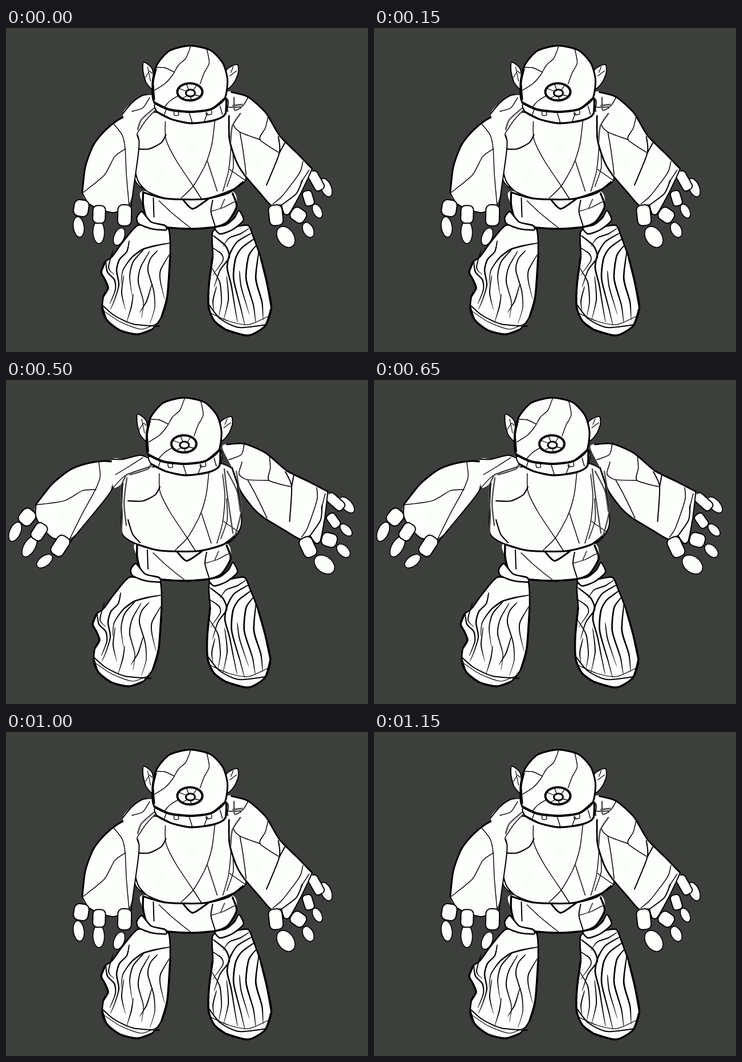
Write an HTML page with a canvas that moves like this. It is 635x568 px and loops after 1250 ms.

```html
<!DOCTYPE html>
<html>
<head>
<meta charset="utf-8">
<title>Stone golem</title>
<style>
html, body { margin: 0; width: 100%; height: 100%; overflow: hidden; background: #3d3f3c; }
canvas { display: block; }
</style>
</head>
<body>
<canvas id="stage" width="635" height="568"></canvas>
<script>
const ctx = document.getElementById('stage').getContext('2d');
const BG = '#3d3f3c', STONE = '#fdfffc', INK = '#000', SMEAR = '#4b4b4b';
const STEP = 250;
const ORDER = ['down', 'mid', 'up', 'mid', 'down'];

// Arms turn around a point in the hand, which is carried to `to`.
const POSES = {
  down: {
    sway: 10.5, leg: 15, lean: 0.033,
    left: { to: [166, 339.8], turn: -13.5 },
    right: { to: [523.5, 318], turn: 8.5 },
    torso: '222,150 217,200 215,264 235,285 272,299 335,300 385,284 410,266 402,225 391,180 378,145 300,150',
    shoulder: '205,150 222,130 240,118 257,116 266,140 246,160 230,186 218,185',
    rim: '205,150 222,130 240,118 257,116',
    folds: ['221,146 240,140 252,122', '230,185 246,161 268,138'],
    smears: ['264,137 238,160 231,178', '400,122 401,144 412,140', '398,136 414,134', '411,150 397,172 394,200']
  },
  mid: {
    sway: 0, leg: 0, lean: 0,
    left: { to: [99.5, 321.3], turn: 0 },
    right: { to: [542.1, 307.4], turn: 0 },
    torso: '240,158 207,192 208,235 206,274 230,288 270,299 335,300 392,284 412,264 413,242 398,215 385,180 375,145 300,150',
    shoulder: '190,150 205,141 225,134 250,132 258,150 232,166 208,192 197,186',
    rim: '191,151 205,142 225,134 250,132',
    folds: ['205,152 225,147 242,136', '202,200 228,172 257,150'],
    smears: ['209,198 206,230 207,272', '213,245 216,273', '196,212 183,252 167,294', '410,240 412,262', '236,160 248,145 252,134']
  },
  up: {
    sway: 0, leg: 0, lean: 0,
    left: { to: [53.5, 278.5], turn: 18 },
    right: { to: [574.1, 267.3], turn: -10 },
    torso: '235,155 207,173 203,225 204,270 230,288 270,299 335,300 392,284 411,260 413,235 407,195 402,160 370,145 300,150',
    shoulder: '186,140 205,138 235,132 255,138 257,152 225,166 206,180 188,188',
    rim: '187,139 205,139 235,132 253,138',
    folds: ['192,166 215,152 240,136', '187,190 210,167 255,151'],
    smears: ['210,168 201,190 204,235 202,270', '212,172 207,215 211,255', '218,166 250,155 256,138', '383,156 388,200 398,268', '404,160 413,225 402,273', '388,160 405,194 411,230']
  }
};

const LEFT_ARM = '192,150 170,155 145,167 119,187 96,221 80,264 86,284 102,299 126,311 150,307 166,286 190,225 198,200 198,182';
const RIGHT_ARM = '377,124 415,127 450,150 480,186 515,212 545,235 540,253 531,282 517,318 508,320 501,306 483,309 460,290 428,262 411,241 394,206 387,165';
const LEFT_LEG = '216,346 190,375 171,401 159,410 152,428 158,440 164,456 156,470 154,496 165,516 185,530 215,537 240,529 258,506 268,470 273,400 270,352 245,350';
const RIGHT_LEG = '357,356 358,400 353,450 354,490 365,514 385,529 425,539 454,522 464,490 455,448 443,405 428,366 418,346 390,350';

const LEFT_FLAMES = [
  '273,377 250,381 225,388 205,403 190,425 187,447',
  '201,374 197,392 184,406 179,425 183,450 176,475 169,492',
  '160,410 163,428 175,441 177,458 168,482',
  '225,390 208,410 202,435 206,468',
  '236,393 221,420 217,445 226,480 223,507',
  '250,391 238,405 234,425 244,460 246,490 238,517',
  '271,398 256,425 256,445 263,474',
  '191,436 188,465 194,492', '208,468 205,488 197,515',
  '240,452 232,478 220,498', '172,392 165,420 174,432'
];
const RIGHT_FLAMES = [
  '424,360 400,375 388,396 384,420 392,450 400,490 405,514',
  '429,370 408,386 398,405 396,440 410,490 418,520',
  '433,382 421,400 418,440 432,485 437,515',
  '438,396 435,440 447,480 450,510',
  '359,365 380,382 387,402 372,424 363,452',
  '357,385 373,396 376,408 360,432',
  '358,422 372,446 376,480 372,506',
  '366,455 361,478 363,495', '419,352 405,361 386,368 376,382',
  '384,438 388,475 381,512', '406,428 410,455 425,500'
];

const parse = s => s.split(' ').map(p => p.split(',').map(Number));

function trace(pts, closed) {
  const n = pts.length;
  const at = i => closed ? pts[(i + n) % n] : pts[Math.max(0, Math.min(n - 1, i))];
  ctx.beginPath();
  ctx.moveTo(...pts[0]);
  for (let i = 0; i < (closed ? n : n - 1); i++) {
    const [a, b, c, d] = [at(i - 1), at(i), at(i + 1), at(i + 2)];
    ctx.bezierCurveTo(b[0] + (c[0] - a[0]) / 8, b[1] + (c[1] - a[1]) / 8,
      c[0] - (d[0] - b[0]) / 8, c[1] - (d[1] - b[1]) / 8, c[0], c[1]);
  }
}

function ink(width, color = INK) {
  ctx.lineWidth = width;
  ctx.strokeStyle = color;
  ctx.stroke();
}

function blob(s, width) {
  trace(parse(s), true);
  ctx.fillStyle = STONE;
  ctx.fill();
  if (width) ink(width);
}

function lines(width, list, color) {
  for (const s of list) {
    trace(parse(s));
    ink(width, color);
  }
}

// Pen stroke that thins towards both ends.
function brush(s, width) {
  const p = parse(s), n = p.length - 1, left = [], right = [];
  p.forEach(([x, y], i) => {
    const a = p[Math.max(0, i - 1)], b = p[Math.min(n, i + 1)];
    const dx = b[0] - a[0], dy = b[1] - a[1], len = Math.hypot(dx, dy);
    const h = width / 2 * (0.3 + 0.7 * Math.sin(Math.PI * (0.15 + 0.85 * i / n)));
    left.push([x - dy / len * h, y + dx / len * h]);
    right.unshift([x + dy / len * h, y - dx / len * h]);
  });
  trace(left.concat(right), true);
  ctx.fillStyle = INK;
  ctx.fill();
}

function oval(x, y, rx, ry, deg = 0, width = 1.6) {
  ctx.beginPath();
  ctx.ellipse(x, y, rx, ry, deg * Math.PI / 180, 0, 7);
  ctx.fillStyle = STONE;
  ctx.fill();
  ink(width);
}

function knuckle(x, y, w, h, deg) {
  ctx.save();
  ctx.translate(x, y);
  ctx.rotate(deg * Math.PI / 180);
  ctx.beginPath();
  ctx.roundRect(-w / 2, -h / 2, w, h, Math.min(w, h) * 0.36);
  ctx.fillStyle = STONE;
  ctx.fill();
  ink(2);
  ctx.restore();
}

function shifted(dx, draw) {
  ctx.save();
  ctx.translate(dx, 0);
  draw();
  ctx.restore();
}

function arm(place, from, draw) {
  ctx.save();
  ctx.translate(...place.to);
  ctx.rotate(place.turn * Math.PI / 180);
  ctx.translate(-from[0], -from[1]);
  draw();
  ctx.restore();
}

function leftArm() {
  oval(60, 321, 9.5, 18, 6);
  oval(92, 338, 10, 20, 12);
  oval(125, 354, 9, 16, 35);
  blob(LEFT_ARM);
  lines(3, ['192,150 170,155 145,167 119,187 96,221 80,264']);
  lines(2, ['80,264 86,284 102,299 126,311 150,307', '197,178 198,200 190,225 166,286 158,307', '191,150 195,168 198,195']);
  lines(1.4, ['162,160 172,183 171,208 163,250 155,303', '82,264 125,243 150,216 172,207']);
  knuckle(72, 290, 26, 29, 22);
  knuckle(100, 308, 22, 31, 15);
  knuckle(143, 320, 24, 37, 15);
}

function rightArm() {
  oval(574, 264, 9, 17, -32);
  oval(565, 307, 7.5, 13, -35);
  oval(554, 342, 9, 14, -35);
  oval(517, 360, 14, 20, -42);
  knuckle(555, 255, 18, 36, -38);
  knuckle(546, 287, 17, 27, -25);
  knuckle(533, 319, 27, 24, 25);
  blob(RIGHT_ARM);
  lines(2.8, ['385,123 415,127 450,150 480,186 515,212 545,235', '387,165 394,206 411,241 428,262 460,290 483,309 501,306']);
  lines(2, ['545,235 540,253 531,282 517,318 508,320 501,306', '531,257 524,282 501,306', '478,188 484,216 470,275', '491,197 484,216']);
  lines(1.5, ['415,128 407,145 384,150', '455,157 453,177 447,198 484,216', '406,158 397,178 410,190 447,198', '527,225 524,246 500,290 486,306', '410,190 420,220 432,262', '540,238 529,262']);
  knuckle(494, 325, 24, 36, -15);
}

function legs(pose) {
  shifted(pose.leg, () => {
    blob(LEFT_LEG, 2.6);
    lines(3.4, ['154,490 162,512 185,530 215,537 240,529', '273,400 268,470 258,506', '159,410 152,428 158,440 164,456 156,470']);
    lines(2, ['154,486 175,504 208,519 254,523']);
    lines(1.2, ['155,495 185,515 222,528 250,518']);
    LEFT_FLAMES.forEach((s, i) => brush(s, i < 3 ? 2.6 : 2));
  });
  ctx.save();
  ctx.transform(1, 0, -pose.lean, 1, pose.lean * 540, 0);
  blob(RIGHT_LEG, 2.6);
  lines(3.4, ['358,400 353,450 354,490 365,514 385,529', '464,490 454,522 425,539 385,529', '443,405 455,448 464,490']);
  lines(2, ['355,486 375,510 408,525 456,520']);
  lines(1.2, ['358,500 390,514 425,520 460,505']);
  RIGHT_FLAMES.forEach((s, i) => brush(s, i < 5 ? 2.8 : 2));
  ctx.restore();
}

function waist() {
  blob('229,286 230,310 238,335 250,345 275,350 315,352 355,349 378,340 394,313 386,286 315,290');
  lines(3.4, ['230,288 230,310 236,333 250,345 275,350 315,352 355,349 378,340 394,313 387,290']);
  blob('228,322 219,332 222,343 245,352 270,354 268,346 244,340', 2.6);
  blob('398,320 406,337 386,354 365,361 356,350 375,345 390,333', 2.6);
  lines(2, ['248,298 249,331', '352,302 349,322 356,346']);
  lines(1.3, ['279,323 296,337 313,350', '350,321 370,315 391,304', '258,303 278,322', '373,300 366,316']);
}

function torso(shape) {
  blob(shape, 2);
  lines(3, ['230,288 270,299 335,300 380,289 405,270', '300,301 317,317 344,300']);
  lines(2.2, ['214,212 240,212 262,201 270,187', '214,245 222,270 235,285']);
  lines(1.4, ['269,164 270,195 288,232 318,277', '356,160 351,202 339,240 318,277 297,298',
    '343,234 360,286', '380,165 384,205 380,250 370,286', '382,248 409,267', '318,277 332,299', '387,208 388,245 377,278']);
}

function head() {
  blob('231,60 246,72 250,109 236,97 230,76', 1.8);
  blob('395,64 397,78 390,95 378,106 376,74', 1.8);
  lines(1.2, ['234,87 241,76 246,80', '238,68 243,93', '382,84 394,75', '388,68 384,78']);
  blob('253,133 256,148 280,160 315,167 354,162 374,151 376,124 315,136', 2);
  lines(3.4, ['256,148 280,160 315,167 354,162 374,151 376,124']);
  lines(1.4, ['284,145 285,153 292,153 292,147', '271,141 267,153', '311,149 316,165', '341,147 341,152 350,151 350,145', '343,149 337,164', '365,137 369,151']);
  blob('249,129 247,95 254,65 276,40 312,31 348,39 370,62 378,91 373,124 350,142 315,147 276,143', 3);
  lines(4, ['250,131 276,143 315,147 350,142 373,124', '249,125 247,95 252,72']);
  lines(1.4, ['313,33 305,53 292,65 282,82 269,97 250,109', '342,38 346,61 337,79 330,98',
    '252,69 269,70 284,77', '291,119 277,128 266,140', '292,118 300,108']);
  oval(312, 112, 22, 15, 0, 4);
  lines(1.3, ['304,110 293,106', '318,109 324,100', '310,108 306,98', '307,119 299,123', '320,117 331,120', '313,120 315,127']);
  oval(313, 114, 8, 6, 0, 3);
}

function draw(pose) {
  ctx.fillStyle = BG;
  ctx.fillRect(0, 0, 635, 568);
  ctx.lineCap = ctx.lineJoin = 'round';
  legs(pose);
  shifted(pose.sway, () => {
    waist();
    torso(pose.torso);
  });
  arm(pose.right, [542.1, 307.4], rightArm);
  arm(pose.left, [99.5, 321.3], leftArm);
  blob(pose.shoulder);
  lines(2, [pose.rim]);
  lines(1.4, pose.folds);
  lines(2.4, pose.smears, SMEAR);
  shifted(pose.sway, head);
}

let shown = -1;
const start = performance.now();
function tick(now) {
  const step = Math.floor(Math.max(0, now - start) / STEP) % ORDER.length;
  if (step !== shown) draw(POSES[ORDER[shown = step]]);
  requestAnimationFrame(tick);
}
tick(start);
</script>
</body>
</html>
```
